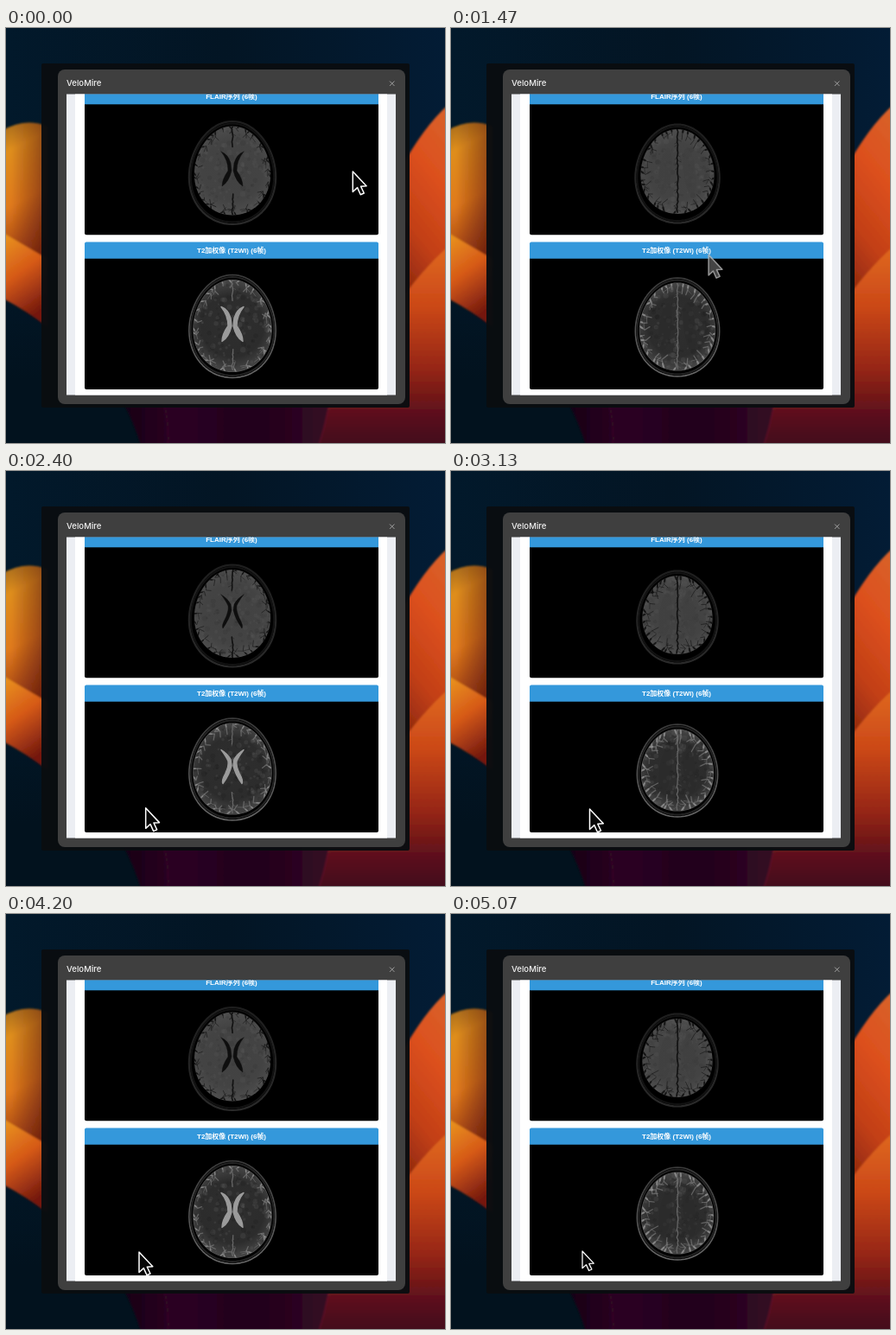
Write an HTML page with a canvas that moves like this. It is 508x480 px and loops after 5140 ms.

```html
<!DOCTYPE html>
<html lang="zh">
<head>
<meta charset="utf-8">
<style>
html, body { margin: 0; width: 100%; height: 100%; overflow: hidden; background: #03131f; }
svg, canvas { position: absolute; left: 0; top: 0; }
canvas { filter: blur(.45px); }
text { font-family: "Liberation Sans", "Noto Sans CJK SC", "Noto Sans CJK", sans-serif; }
.head { font-size: 8px; font-weight: 700; fill: #fff; text-anchor: middle; }
.title { font: 500 9.6px Inter, sans-serif; fill: #f2f2f2; }
</style>
</head>
<body>
<svg width="508" height="480">
  <defs>
    <linearGradient id="sky"><stop stop-color="#02192b"/><stop offset=".5" stop-color="#031524"/><stop offset="1" stop-color="#031c35"/></linearGradient>
    <linearGradient id="dusk" x2="0" y2="1"><stop offset=".5" stop-color="#02121e" stop-opacity="0"/><stop offset=".85" stop-color="#02121e"/></linearGradient>
    <linearGradient id="leftTop" x2=".15" y2="1"><stop stop-color="#a0681c"/><stop offset=".2" stop-color="#df8e1e"/><stop offset=".55" stop-color="#e07a1c"/><stop offset="1" stop-color="#8a2c12"/></linearGradient>
    <linearGradient id="leftLow" x2=".35" y2="1"><stop stop-color="#eb9a20"/><stop offset=".5" stop-color="#d65a18"/><stop offset="1" stop-color="#74180f"/></linearGradient>
    <linearGradient id="shade"><stop offset=".2" stop-color="#4a0c0a" stop-opacity="0"/><stop offset="1" stop-color="#4a0c0a" stop-opacity=".55"/></linearGradient>
    <linearGradient id="rightTop" x1=".8" x2=".5" y2="1"><stop stop-color="#d8622a"/><stop offset=".35" stop-color="#dc501e"/><stop offset=".7" stop-color="#c23f16"/><stop offset="1" stop-color="#8e280f"/></linearGradient>
    <linearGradient id="rightLow" x2="0" y2="1"><stop stop-color="#e06a20"/><stop offset=".3" stop-color="#cb4818"/><stop offset=".6" stop-color="#962614"/><stop offset=".82" stop-color="#5c0f1c"/><stop offset="1" stop-color="#3c0a1c"/></linearGradient>
    <linearGradient id="plum"><stop stop-color="#160414"/><stop offset=".25" stop-color="#2c0623"/><stop offset=".6" stop-color="#20051d"/><stop offset="1" stop-color="#360823"/></linearGradient>
    <filter id="soft"><feGaussianBlur stdDeviation="1.2"/></filter>
    <clipPath id="view"><rect x="70" y="76.5" width="381" height="348"/></clipPath>
  </defs>
  <rect width="508" height="480" fill="url(#sky)"/>
  <rect width="508" height="480" fill="url(#dusk)"/>
  <g filter="url(#soft)">
    <path d="M-5 119Q22 103 48 114V290H-5Z" fill="url(#leftTop)"/>
    <path d="M-5 119Q22 103 48 114V290H-5Z" fill="url(#shade)"/>
    <path d="M-5 236L48 267V346Q22 326-5 312Z" fill="url(#leftLow)"/>
    <path d="M134 430Q150 460 158 490H385V430Z" fill="url(#plum)"/>
    <path d="M182 430Q190 460 187 490" fill="none" stroke="#3e0a2a"/>
    <path d="M515 86Q484 112 455 166V330H515Z" fill="url(#rightTop)"/>
    <path d="M515 250Q480 280 450 325L374 430Q369 462 359 490H515Z" fill="url(#rightLow)"/>
    <path d="M374 436Q369 462 360 490" fill="none" stroke="#64162c"/>
  </g>
  <rect x="41" y="41" width="426" height="398" rx="2" fill="#0a0d10" opacity=".96"/>
  <rect x="60" y="48" width="402" height="387" rx="8" fill="#3f3f3f"/>
  <text class="title" x="70" y="67">VeloMire</text>
  <path d="M444 61.5l5.4 5.4m0-5.4l-5.4 5.4" stroke="#a0a0a0"/>
  <g clip-path="url(#view)">
    <rect x="70" y="76" width="381" height="350" fill="#eceef3"/>
    <rect x="80" y="76" width="361" height="350" fill="#fff"/>
    <rect x="91" y="69" width="340" height="170.3" rx="2"/>
    <rect x="91" y="69" width="340" height="19.3" fill="#3498db"/>
    <text class="head" x="261" y="82">FLAIR序列 (6帧)</text>
    <rect x="91" y="249" width="340" height="169" rx="2"/>
    <path d="M91 266.8V249.6q0-2 2-2H429q2 0 2 2V266.8Z" fill="#3498db"/>
    <text class="head" x="261" y="260.2">T2加权像 (T2WI) (6帧)</text>
  </g>
</svg>
<canvas id="scans" width="508" height="480"></canvas>
<svg width="508" height="480">
  <path id="cursor" d="M0 0V23.5L5.3 18.6L9 26.8L13 25L9.3 17.2L15.8 16.8Z" stroke-width="1.5" stroke-linejoin="round"/>
</svg>
<script>
const g = document.getElementById('scans').getContext('2d');
const cursor = document.getElementById('cursor');
const LOOP = 5140, STEP = 1000 / 3, TAU = Math.PI * 2;

// Slices from low to high: centre y, half width, half height, sulcus depth.
const slices = [
  [167, 51, 61.5, .2], [167.5, 51, 60.5, .19], [167.5, 51, 61, .17],
  [168, 50.5, 59.5, .21], [168.5, 49.5, 58.5, .26], [169, 47.5, 55, .32]
];

// Left half of each ventricle system, mirrored when drawn.
const ventricles = [
  'M-13-24Q-5-20-1-12V-6L-3-7Q-5-14-13-24Z M-1 8Q-8 9-14 14Q-18 20-14 22Q-9 15-1 13Z',
  'M-13-22Q-6-18-2-11L-1-4Q-3 6-11 17Q-13 14-8 5Q-4-4-5-9Q-7-14-13-22Z',
  'M-13-22Q-5-19-2-9L-1 0Q-4 13-12 18Q-12 10-5 0Q-5-12-13-22Z',
  'M-8-17Q-4-10-2 0Q-4 8-9 17Q-7 6-5 0Q-5-8-8-17Z'
].map(d => new Path2D(d));

const moves = [
  [0, 401.3, 166, 1], [1180, 401.3, 166, 1], [1820, 162.5, 389, 1],
  [3130, 160.5, 391, 1], [4200, 154, 391, 1], [5070, 152, 390, .84], [LOOP, 152, 390, .84]
];

function seeded(n) {
  return () => {
    n = (n * 16807) % 2147483647;
    return n / 2147483647;
  };
}

const grey = (v, a = 1) => `rgba(${v},${v},${v},${a})`;

// A point on a head-shaped oval, wider at the back.
const oval = (rx, ry, a) => [rx * Math.cos(a) * (1 + .08 * Math.sin(a)), ry * Math.sin(a)];

function ovalPath(rx, ry) {
  g.beginPath();
  for (let i = 0; i < 72; i++) g.lineTo(...oval(rx, ry, i / 72 * TAU));
  g.closePath();
}

function line(points, color, width) {
  g.beginPath();
  points.forEach(p => g.lineTo(...p));
  g.strokeStyle = color;
  g.lineWidth = width;
  g.stroke();
}

function ring(rx, ry, color, width) {
  ovalPath(rx, ry);
  g.strokeStyle = color;
  g.lineWidth = width;
  g.stroke();
}

function drawHead(index, t2) {
  const [cy, rx, ry, depth] = slices[index];
  const bx = rx - (t2 ? 6 : 7), by = ry - (t2 ? 8 : 9.5), high = index > 3;
  const rnd = seeded(index * 911 + 77);
  g.save();
  g.translate(262, cy + (t2 ? 177.5 : 0));
  g.lineCap = g.lineJoin = 'round';

  // Scalp and skull
  const scalp = g.createLinearGradient(0, -ry, 0, ry);
  scalp.addColorStop(0, grey(t2 ? 58 : 30));
  scalp.addColorStop(1, grey(t2 ? 105 : 42));
  ring(rx - 1, ry - 1.5, scalp, t2 ? 1.6 : 2.2);
  ring(rx - 3, ry - 4, grey(t2 ? 34 : 18), 2);

  // Brain tissue sits a little forward of the skull's centre
  g.translate(0, t2 ? -.5 : -2.5);
  if (t2) ring(bx, by, grey(85), 1.2);
  ovalPath(bx, by);
  const tone = g.createRadialGradient(0, 0, 8, 0, 0, by);
  tone.addColorStop(0, grey(t2 ? 46 : 66));
  tone.addColorStop(.62, grey(t2 ? 44 : 67));
  tone.addColorStop(1, grey(t2 ? 70 : 78));
  g.fillStyle = tone;
  g.fill();
  g.save();
  g.clip();
  for (let i = 0; i < 150; i++) {
    const [x, y] = oval(bx, by, rnd() * TAU), r = Math.sqrt(rnd());
    g.beginPath();
    g.arc(x * r, y * r, 1 + rnd() * 2.2, 0, TAU);
    g.fillStyle = grey(rnd() < .5 ? 15 : 125, t2 ? .14 : .08);
    g.fill();
  }

  // Sulci, alike on both sides
  const ink = t2 ? 125 : 24;
  for (const side of [-1, 1]) {
    for (let i = 0; i < 17; i++) {
      const a = -1.42 + i * .178 + (rnd() - .5) * .13;
      const reach = depth * (.4 + rnd() * .85);
      const at = (turn, r) => {
        const [x, y] = oval(bx, by, a + turn);
        return [side * x * r, y * r];
      };
      const bend = (rnd() - .5) * .3;
      const mid = at(bend, 1 - reach * .5), end = at(bend * .2, 1 - reach);
      line([at(0, 1.02), mid, end], grey(ink, .65), t2 ? 1.3 : 1);
      line([at(0, 1.02), at(bend * .5, 1 - reach * .25)], grey(t2 ? 145 : 12, .75), high ? 2.2 : 1.6);
      if (rnd() < .6) line([mid, at(bend + .15, 1 - reach * .65)], grey(ink, .5), 1);
    }
  }

  // White matter of the upper slices
  if (high) {
    for (const side of [-1, 1]) {
      g.beginPath();
      g.ellipse(side * 14, 0, 7, by * .55, -side * .12, 0, TAU);
      g.fillStyle = grey(t2 ? 42 : 64, .6);
      g.fill();
    }
  }

  // Midline
  const fissure = (from, to) => {
    const points = [];
    for (let y = from; y <= to; y += 3) points.push([(rnd() - .5) * 1.6, y]);
    line(points, grey(t2 ? 105 : 16), t2 ? 1.2 : 1.6);
    for (const [x, y] of points) {
      if (rnd() < .6) line([[x, y], [x + (rnd() - .5) * 9, y + 2]], grey(t2 ? 100 : 28, .55), .9);
    }
  };
  if (high) fissure(-by, by);
  else {
    fissure(-by, -27);
    fissure(27, by);
  }

  // Ventricles
  if (!high) {
    for (const side of [-1, 1]) {
      g.save();
      g.scale(side, 1);
      g.fillStyle = g.strokeStyle = grey(t2 ? 155 : 14);
      g.lineWidth = t2 ? 1.4 : .4;
      g.fill(ventricles[index]);
      g.stroke(ventricles[index]);
      g.restore();
    }
  }
  g.restore();
  g.restore();
}

function moveCursor(t) {
  const i = moves.findIndex(m => m[0] > t);
  const a = moves[i - 1], b = moves[i];
  const u = (t - a[0]) / (b[0] - a[0]), s = u * u * (3 - 2 * u);
  const [x, y, size] = [1, 2, 3].map(k => a[k] + (b[k] - a[k]) * s);
  const fast = i === 2 && u > .1 && u < .9;
  cursor.setAttribute('transform', `translate(${x} ${y}) scale(${size})`);
  cursor.setAttribute('fill', fast ? '#555' : '#080808');
  cursor.setAttribute('stroke', fast ? '#bbb' : '#fff');
  cursor.setAttribute('opacity', fast ? .8 : 1);
}

function draw() {
  const t = performance.now() % LOOP;
  const n = Math.floor(t / STEP + .15);
  const index = (20 - n) % 6;
  g.clearRect(0, 0, 508, 480);
  drawHead(index, false);
  drawHead(index, true);
  moveCursor(t);
  requestAnimationFrame(draw);
}
draw();
</script>
</body>
</html>
```
